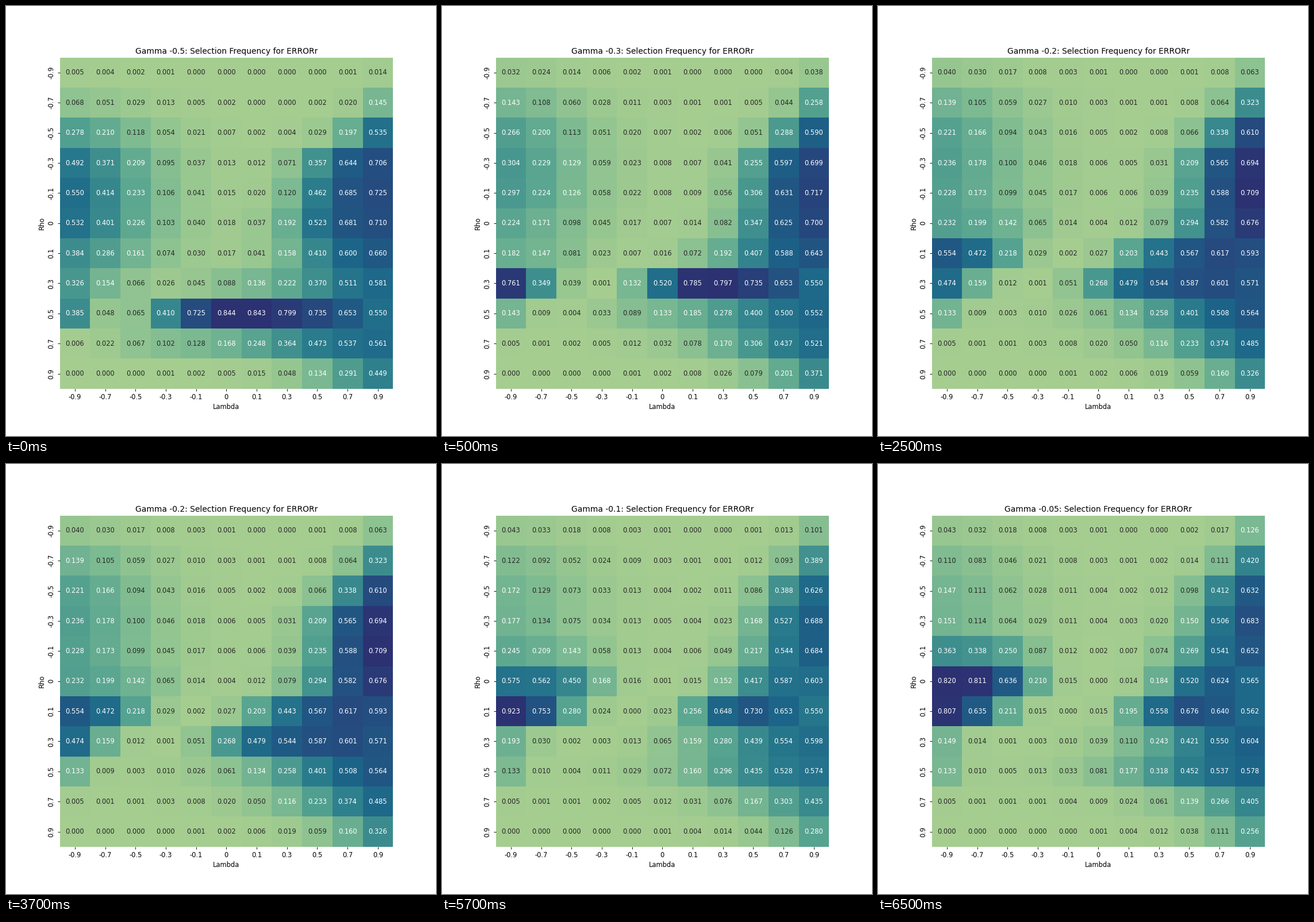
Write a matplotlib script that moves like this. It is 748x748 px and loops after 8000 ms.

```python
import numpy as np
import matplotlib.pyplot as plt
from matplotlib.animation import FuncAnimation
from matplotlib.colors import LinearSegmentedColormap

plt.rcParams["font.family"] = "DejaVu Sans"

SIZE_PX, SIZE_IN = 748, 9
AXIS_LABELS = ["-0.9", "-0.7", "-0.5", "-0.3", "-0.1", "0",
               "0.1", "0.3", "0.5", "0.7", "0.9"]
GAMMAS = ["-0.5", "-0.3", "-0.2", "-0.1", "-0.05"]
N = len(AXIS_LABELS)
CREST = LinearSegmentedColormap.from_list("crest", [
    "#a5cd90", "#7dba91", "#59a590", "#40908e",
    "#287a8c", "#1c6488", "#254b7f", "#2c3172"])
LIGHT_TEXT_FROM = 0.1525

# Column where the right-hand slope reaches half height, at a few rows,
# for the first and the last gamma
SLOPE_ROWS = [0, 2, 3, 5, 8, 9, 10]
SLOPE_FIRST = [11.7, 9.4, 8.0, 7.5, 8.2, 6.9, 9.0]
SLOPE_LAST = [10.6, 8.8, 8.6, 8.7, 6.9, 9.2, 10.2]


def bell(v, centre, width, power=2):
    return np.exp(-np.abs((v - centre) / width) ** power)


def mix(a, b, t):
    return a + (b - a) * t


def selection_frequency(gamma):
    """Frequency by row (rho) and column (lambda)."""
    y, x = np.mgrid[:N, :N]
    rho = np.array(AXIS_LABELS, dtype=float)[y]
    t = (gamma + 0.5) / 0.45
    eased = t ** 0.6

    # Hill on the left, which sinks and moves up as gamma rises
    left = (mix(0.55, 0.15, eased) * bell(y, mix(4.2, 2.7, eased), 2.5, 3)
            * bell(x, 0, 2.2, 1.6))
    corner = 0.15 * bell(y, 7.5, 1, 3) * bell(x, 0, 0.6)

    # Slope up to the right edge
    middle = mix(np.interp(y, SLOPE_ROWS, SLOPE_FIRST),
                 np.interp(y, SLOPE_ROWS, SLOPE_LAST), t)
    softness = 0.45 + 0.6 * bell(y, 8.5, 2.2)
    height = 0.58 + 0.15 * bell(y, 4, 3)
    right = height / (1 + np.exp((middle - x) / softness))

    # Ridge along rho = -gamma, cut by a valley near lambda = -rho
    valley = bell(x, 5 - np.maximum(y - 5, 0) ** 1.15,
                  mix(2, 2.7, t), mix(2, 4, t))
    ridge = (0.93 - 0.38 * (x / 10) ** 3) * (1 - valley)
    return mix(left + corner + right, ridge, bell(rho, -gamma, 0.135))


fig, ax = plt.subplots(figsize=(SIZE_IN, SIZE_IN), dpi=SIZE_PX / SIZE_IN,
                       facecolor="white")
mesh = ax.pcolormesh(np.zeros((N, N)), cmap=CREST, vmin=0, vmax=1)
ax.set(xlim=(0, N), ylim=(N, 0))
ax.set_xlabel("Lambda", labelpad=3.4)
ax.set_ylabel("Rho", labelpad=3.4)
ax.spines[:].set_visible(False)
centres = np.arange(N) + 0.5
ax.set_xticks(centres, AXIS_LABELS)
ax.set_yticks(centres, AXIS_LABELS, rotation=90, va="center")
title = ax.set_title("")
labels = [ax.text(x, y, "", ha="center", va="center")
          for y in centres for x in centres]


def update(frame):
    # The first heatmap is held for one step, the next ones for four
    gamma = GAMMAS[(frame + 3) // 4]
    freq = selection_frequency(float(gamma))
    share = freq / freq.max()
    mesh.set_array(share)
    title.set_text(f"Gamma {gamma}: Selection Frequency for ERRORr")
    for label, value, part in zip(labels, freq.flat, share.flat):
        label.set_text(f"{value:.3f}")
        label.set_color("white" if part > LIGHT_TEXT_FROM else "0.15")
    return [mesh, title, *labels]


anim = FuncAnimation(fig, update, frames=16, interval=500,
                     repeat=True, repeat_delay=0, blit=False)
plt.show()
```
